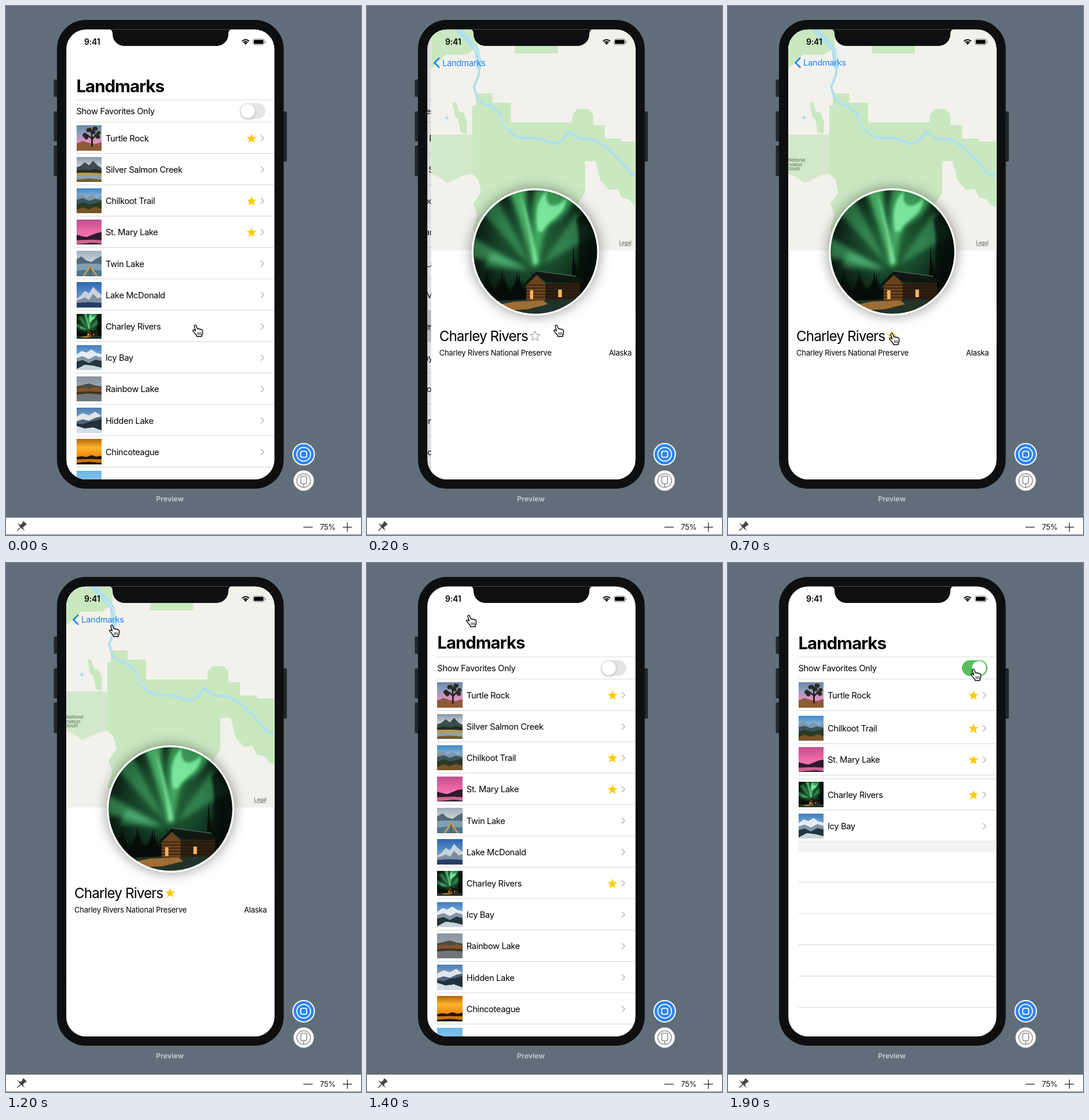
Write an HTML page with a canvas that moves like this. It is 613 px wide and 914 px high and loops after 2000 ms.

```html
<!DOCTYPE html>
<html lang="en">
<head>
<meta charset="utf-8">
<title>Landmarks preview</title>
<style>
html, body { margin: 0; width: 100%; height: 100%; overflow: hidden; background: #616e7a; }
canvas { display: block; }
</style>
</head>
<body>
<canvas id="stage" width="613" height="914"></canvas>
<script>
const ctx = document.getElementById('stage').getContext('2d');
const LOOP = 2000, STEP = 100, ROW = 54.2, WIDTH = 360;
const BLUE = '#1f86f4', YELLOW = '#fccb0a';
const TAP_ROW = 100, PUSH = 123, FAVORITE = 600, POP = 1284, FILTER = 1841;

const clamp = v => Math.max(0, Math.min(1, v));
const mix = (a, b, k) => a + (b - a) * k;
// Critically damped spring, 0 to 1
const spring = ms => {
  const x = Math.max(0, ms) * 0.077;
  return 1 - (1 + x) * Math.exp(-x);
};

// ---------- drawing helpers ----------
function text(str, x, y, size, color = '#000', weight = 400, spacing = -0.025, style = '') {
  ctx.font = `${style} ${weight} ${size}px Inter, "Liberation Sans", sans-serif`;
  ctx.letterSpacing = `${spacing * size}px`;
  ctx.fillStyle = color;
  ctx.fillText(str, x, y);
}
function box(x, y, w, h, color, radius = 0) {
  ctx.fillStyle = color;
  ctx.beginPath();
  ctx.roundRect(x, y, w, h, radius);
  ctx.fill();
}
function line(color, width, ...points) {
  ctx.strokeStyle = color;
  ctx.lineWidth = width;
  ctx.beginPath();
  for (let i = 0; i < points.length; i += 2) ctx.lineTo(points[i], points[i + 1]);
  ctx.stroke();
}
function disc(x, y, r, fill, stroke, width) {
  ctx.beginPath();
  ctx.arc(x, y, r, 0, 7);
  if (fill) { ctx.fillStyle = fill; ctx.fill(); }
  if (stroke) { ctx.strokeStyle = stroke; ctx.lineWidth = width; ctx.stroke(); }
}
function star(x, y, filled) {
  ctx.beginPath();
  for (let i = 0; i < 10; i++) {
    const a = i * Math.PI / 5 - Math.PI / 2, r = i % 2 ? 3.8 : 9;
    ctx.lineTo(x + r * Math.cos(a), y + r * Math.sin(a));
  }
  ctx.closePath();
  ctx.fillStyle = YELLOW;
  ctx.strokeStyle = '#8e8e93';
  ctx.lineWidth = 1;
  filled ? ctx.fill() : ctx.stroke();
}

// ---------- pictures, painted once in a 100 x 100 space ----------
function picture(size, paint) {
  const c = document.createElement('canvas');
  c.width = c.height = size;
  const g = c.getContext('2d');
  g.scale(size / 100, size / 100);
  paint(g, size);
  return c;
}
function fillWith(g, gradient, colors) {
  colors.forEach((c, i) => gradient.addColorStop(i / (colors.length - 1), c));
  g.fillStyle = gradient;
  g.fillRect(0, 0, 100, 100);
}
function ridge(g, color, ...heights) {
  g.fillStyle = color;
  g.beginPath();
  g.moveTo(0, 100);
  heights.forEach((y, i) => g.lineTo(100 * i / (heights.length - 1), y));
  g.lineTo(100, 100);
  g.fill();
}
function shape(g, path, color) {
  g.fillStyle = color;
  g.fill(new Path2D(path));
}
function stroke(g, path, width, color) {
  g.lineWidth = width;
  g.strokeStyle = color;
  g.stroke(new Path2D(path));
}
function firs(g, from, to, top, base) {
  g.fillStyle = '#060d08';
  for (let x = from, i = 0; x < to; x += 1.7, i++) {
    const y = top + (base - top) * 0.55 * Math.abs(Math.sin(i * 2.7));
    g.beginPath();
    g.moveTo(x, y); g.lineTo(x + 2.4, base); g.lineTo(x - 2.4, base);
    g.fill();
  }
}
function aurora(g, size) {
  fillWith(g, g.createRadialGradient(50, 42, 8, 50, 42, 62), ['#1f5c31', '#17472a', '#0c2315', '#07130c']);
  g.globalCompositeOperation = 'screen';
  g.filter = `blur(${size * 0.02}px)`;
  shape(g, 'M47 62L6 16L20 8Z', '#1c4f2b');
  shape(g, 'M45 64L0 38V54Z', '#245f36');
  shape(g, 'M44 64L10 62L16 50Z', '#1f5530');
  shape(g, 'M55 60L82 20L98 36Z', '#1b4c2a');
  shape(g, 'M48 62C44 42 36 18 28 0H43C42 20 47 42 52 60Z', '#36924a');
  shape(g, 'M49 60C49 40 46 20 50 0H84C79 14 74 22 64 27C57 31 55 40 53 60Z', '#2a7a3d');
  g.filter = `blur(${size * 0.01}px)`;
  shape(g, 'M49 60C46 40 42 22 38 4C45 22 49 40 52 58Z', '#3f9650');
  shape(g, 'M52 34C49 18 52 8 59 2C57 14 64 18 74 8C74 22 61 23 56 34Z', '#4fb866');
  g.globalCompositeOperation = 'source-over';
  shape(g, 'M80 90C82 66 87 46 82 24L90 18L101 12V90Z', 'rgba(5,12,8,.78)');
  g.filter = 'none';
  firs(g, 0, 48, 63, 88);
  firs(g, 80, 104, 44, 88);
  ridge(g, '#22332a', 89, 88, 87, 87, 88);
  shape(g, 'M18 92L34 89L56 88L60 91L44 95L24 96Z', '#a06d33');
  shape(g, 'M43 76L51 68L58 75V88H43Z', '#6b431d');
  shape(g, 'M58 75L85 74V87L58 88Z', '#2f2013');
  for (let y = 76; y < 88; y += 2.4) stroke(g, `M43 ${y}H85`, 0.5, '#1c130b');
  shape(g, 'M39 77L51 65L82 69L88 74L59 74L51 68L42 77Z', '#101712');
  stroke(g, 'M51 65L82 69', 0.7, '#46604e');
  g.fillStyle = '#ffb45a';
  g.fillRect(45.8, 80, 2.6, 7);
  g.fillRect(68, 79.5, 2.8, 6);
}
function joshuaTree(g) {
  stroke(g, 'M62 84V52L40 36M62 56L80 34M62 52L60 24', 6, '#2a2018');
  g.fillStyle = '#2c2a20';
  for (let i = 0; i < 12; i++) {
    g.beginPath();
    g.arc(60 + 28 * Math.cos(i * 2.4), 30 + 18 * Math.sin(i * 1.7), 8, 0, 7);
    g.fill();
  }
}
const scene = (sky, ridges, extra) => picture(88, g => {
  fillWith(g, g.createLinearGradient(0, 0, 0, 100), sky);
  ridges.forEach(r => ridge(g, ...r));
  if (extra) extra(g);
});
const nightCabin = picture(440, aurora);
const landmarks = [
  ['Turtle Rock', scene(['#6d86ab', '#8fa0bd', '#e58fc0', '#c9806f'],
    [['#8c5b44', 72, 62, 70, 74, 66], ['#8f5b31', 82, 78, 84, 80]], joshuaTree)],
  ['Silver Salmon Creek', scene(['#8797a6', '#dfe4e6', '#9ca8ae'],
    [['#3d4b4f', 42, 36, 22, 34, 16, 34, 44], ['#23301f', 56, 50, 54, 48, 55], ['#b89a4e', 64, 63, 65],
     ['#8fa3ad', 76, 74, 77], ['#6f5f31', 90, 86, 91]])],
  ['Chilkoot Trail', scene(['#3f86c4', '#a9c9de', '#d0dde4'],
    [['#8196a6', 34, 22, 38, 26, 40, 30], ['#3a5561', 46, 40, 50, 42, 48], ['#2c3a22', 66, 56, 64, 60, 52],
     ['#7a5428', 86, 76, 84, 74, 82]])],
  ['St. Mary Lake', scene(['#c0508f', '#f06aa8', '#e889b4'],
    [['#2c1a2c', 60, 66, 70, 62, 54, 50], ['#d0648f', 82, 81, 80, 82], ['#3a2034', 98, 95, 92, 96]])],
  ['Twin Lake', scene(['#9fb0bd', '#d3dadd', '#8fa9b8'],
    [['#53697a', 34, 22, 38, 44, 30, 20], ['#7fa0b4', 52, 50, 52], ['#4d7690', 78, 74, 78]],
    g => { stroke(g, 'M28 100L55 62L82 100', 7, '#c79a4b'); stroke(g, 'M55 66V100', 4, '#5f4a2c'); })],
  ['Lake McDonald', scene(['#2f66ad', '#5f92cc', '#88a9cc'],
    [['#c9d2dc', 66, 54, 34, 44, 18, 36, 50], ['#7d8da0', 72, 68, 60, 70, 46, 64, 60], ['#243f66', 82, 79, 82]])],
  ['Charley Rivers', nightCabin],
  ['Icy Bay', scene(['#3f7fc2', '#86b0d6', '#b9cddc'],
    [['#e6ecf1', 40, 24, 30, 18, 32, 36], ['#8296a6', 52, 44, 56, 42, 50], ['#26343c', 66, 60, 72, 58, 64],
     ['#c8d4dc', 96, 78, 82, 90]])],
  ['Rainbow Lake', scene(['#8593a3', '#a3a7a8', '#7d6a50'],
    [['#4d4b45', 40, 34, 28, 36, 40], ['#84532a', 50, 44, 49, 43, 50], ['#3f3322', 62, 60, 62],
     ['#6f767c', 72, 68, 72]])],
  ['Hidden Lake', scene(['#4a7db5', '#93b2cc', '#cfd9e0'],
    [['#dfe6eb', 36, 22, 30, 16, 34], ['#50657a', 54, 46, 52, 40, 34], ['#23303a', 62, 66, 56, 52, 44],
     ['#d6dee6', 72, 82, 78, 90]])],
  ['Chincoteague', scene(['#b8650c', '#ffb52e', '#f08a12', '#7a3c08'],
    [['#24150a', 72, 68, 71, 64, 70, 66], ['#c8760f', 80, 79, 80], ['#1c1209', 94, 90, 95]])],
  ['', scene(['#6cb8e8', '#a5d4f0'], [['#3f6a3c', 70, 62, 70]])],
  ['', scene(['#6cb8e8', '#a5d4f0'], [['#3f6a3c', 70, 62, 70]])]
];

// ---------- list page ----------
function toggle(on) {
  box(404, 168, 44, 27, on > 0.5 ? '#57bf60' : '#e4e4e5', 13.5);
  ctx.shadowColor = 'rgba(0,0,0,.25)';
  ctx.shadowBlur = 4;
  ctx.shadowOffsetY = 1.5;
  disc(mix(417.5, 434.5, on), 181.5, 12.3, '#fff');
  ctx.shadowColor = 'transparent';
}
function listPage(t, push) {
  const filtered = spring(t - FILTER);
  const favorites = t >= FAVORITE ? [0, 2, 3, 6] : [0, 2, 3];
  const separator = y => box(121.5, y - 0.6, 342, 1.2, '#dcdcde');
  ctx.save();
  ctx.translate(-0.3 * WIDTH * push, 0);
  separator(162);
  separator(200.5);
  text('Show Favorites Only', 121.5, 187.3, 14.7);
  toggle(filtered);
  let y = 200.5;
  landmarks.forEach(([name, image], i) => {
    const favorite = favorites.includes(i);
    const gone = favorite || i === 7 ? 0 : filtered;
    ctx.globalAlpha = clamp(1 - gone * 1.1);
    if (i === 6 && t >= TAP_ROW && t < POP) box(0, y, 600, ROW, '#d1d1d4');
    ctx.drawImage(image, 121.5, y + 5.8, 43.5, 43.5);
    text(name, 172, y + 33.2, 14.7);
    if (favorite) star(424, y + 28.5, true);
    line('#c3c3c7', 1.9, 440, y + 22.6, 445.2, y + 27.8, 440, y + 33);
    ctx.globalAlpha = 1;
    y += ROW * (1 - gone);
    if (!(gone && (i === 1 || i === 4))) separator(y);
  });
  while ((y += ROW) < 818) separator(y);
  ctx.restore();
  box(104, 41, WIDTH, 778, `rgba(0,8,0,${0.14 * push})`);
}

// ---------- detail page ----------
const PARKS = new Path2D(`M104 41H184V70L166 84H130L104 108Z M249 41H323V82H249Z
  M141 167L147 166L152 182L160 184L166 200L165 221L155 218L151 196L145 190Z
  M175 172H181V151H210V167H242V201H348V187L357 178H376L384 187V206H404V229H433V234H464V348L455 345
  L446 334L433 331L426 316L411 318L396 300L388 268H370V322L355 345L340 425H200L176 386L184 360
  L177 342L190 322L186 300L175 290Z`);
const RESERVE = new Path2D('M104 222H175V290L160 293L132 306L118 296L104 290Z');
const RIVER = new Path2D(`M148 41L165 56L182 74L189 95L186 120L178 140L184 160Q192 171 207 172L222 186
  L231 207L245 222Q258 230 285 228L317 238L331 232L342 217L360 229L385 231L405 243L425 262L440 278L450 291L464 294`);

function detailPage(t, offset) {
  ctx.save();
  ctx.translate(offset, 0);
  box(104, 41, WIDTH, 778, '#fff');
  ctx.save();
  ctx.beginPath();
  ctx.rect(104, 41, WIDTH, 381.5);
  ctx.clip();
  box(104, 41, WIDTH, 382, '#f3f1ec');
  ctx.fillStyle = '#d3e8cb';
  ctx.fill(RESERVE);
  ctx.fillStyle = '#c9e8c0';
  ctx.fill(PARKS);
  ctx.lineJoin = 'round';
  ctx.strokeStyle = '#aee0f1';
  ctx.lineWidth = 4;
  ctx.stroke(RIVER);
  line('#aee0f1', 8, 150, 41, 166, 57, 183, 76, 187, 108);
  line('#e4f1ea', 1.2, 176, 66, 185, 80, 188, 96);
  line('#e4f1ea', 1.2, 224, 192, 232, 208, 238, 212);
  disc(131, 193, 2.8, '#aee0f1');
  if (t >= 300) {
    ['National', 'rvation', 'South'].forEach((word, i) =>
      text(word, 104, 269 + i * 7.6, 7.4, '#4a6b4a', 400, 0, 'italic'));
  }
  text('Legal', 428.5, 412.3, 8.4, '#55564f', 400, 0);
  line('#55564f', 0.7, 428.5, 414, 449.5, 414);
  ctx.restore();

  ctx.shadowColor = 'rgba(0,0,0,.42)';
  ctx.shadowBlur = 22;
  disc(284, 425, 110, '#fff');
  ctx.shadowColor = 'transparent';
  ctx.save();
  ctx.beginPath();
  ctx.arc(284, 425, 106.8, 0, 7);
  ctx.clip();
  ctx.drawImage(nightCabin, 174, 315, 220, 220);
  ctx.restore();

  text('Charley Rivers', 118, 578.5, 24.2, '#000', 400, -0.036);
  star(283.5, 570.5, t >= FAVORITE);
  text('Charley Rivers National Preserve', 118, 603.8, 13, '#000', 400, -0.018);
  text('Alaska', 411, 603.8, 13, '#000', 400, -0.018);
  ctx.restore();
}

// Large title shrinks into the back button
function navTitle(push) {
  const k = push ** 0.75, tint = push * push;
  ctx.globalAlpha = 1 - 2.2 * push * (1 - push);
  text('Landmarks', mix(121.5, 130, k), mix(148.6, 103.3, k), mix(29.5, 14.7, k),
    `rgb(${31 * tint},${134 * tint},${244 * tint})`, push > 0.9 ? 400 : 700, mix(-0.036, -0.025, k));
  ctx.globalAlpha = clamp((push - 0.7) / 0.28);
  line(BLUE, 2.6, 125, 89.5, 116.5, 98, 125, 106.5);
  ctx.globalAlpha = 1;
}

// ---------- surroundings ----------
function statusBar() {
  ctx.fillStyle = '#0e0f10';
  ctx.fill(new Path2D('M178 40Q184 41 184 48C184 60 193 69 205 69H363C375 69 384 60 384 48Q384 41 390 40Z'));
  text('9:41', 135, 67.2, 14, '#000', 600, -0.015);
  [[2, 3], [5.3, 2], [8.7, 2]].forEach(([r, w]) => {
    ctx.beginPath();
    ctx.arc(413.7, 67, r, -Math.PI * 0.75, -Math.PI * 0.25);
    ctx.strokeStyle = '#000';
    ctx.lineWidth = w;
    ctx.stroke();
  });
  ctx.beginPath();
  ctx.roundRect(426.5, 57, 19.5, 10, 3);
  ctx.strokeStyle = '#8b8b8b';
  ctx.lineWidth = 1;
  ctx.stroke();
  box(428, 58.5, 16.5, 7, '#000', 1.5);
  box(447, 60.3, 1.5, 3.6, '#8b8b8b', 1);
}
function phoneBody() {
  box(0, 0, 613, 914, '#616e7a');
  [[82.5, 127, 30], [82.5, 182, 52], [82.5, 241, 53], [478, 182, 87]]
    .forEach(([x, y, h]) => box(x, y, 7, h, '#23282b', 2));
  box(88, 24, 391.5, 810, '#0e0f10', 50);
}
function canvasControls() {
  text('Preview', 259, 856, 12.4, '#c8cdd1', 600, 0);
  disc(514, 774.5, 19.5, '#fff');
  disc(514, 774.5, 17.5, '#2d85f6');
  disc(514, 774.5, 11.8, null, '#fff', 1.8);
  ctx.beginPath();
  ctx.roundRect(508.8, 769.3, 10.4, 10.4, 2.5);
  ctx.stroke();
  disc(514, 820, 17.5, '#fff');
  disc(514, 820, 11.8, null, '#8d8d8d', 1.5);
  box(508, 811.5, 12, 15, '#fff');
  ctx.beginPath();
  ctx.roundRect(509, 812.5, 10, 13, 2);
  ctx.stroke();
  line('#8d8d8d', 1.5, 514, 826, 514, 832);

  box(0, 884, 613, 30, '#fff');
  box(0, 912.5, 613, 1.5, '#a9adb0');
  line('#333', 1.4, 513.5, 900.5, 529.5, 900.5);
  line('#333', 1.4, 581.5, 900.5, 597.5, 900.5);
  line('#333', 1.4, 589.5, 892.5, 589.5, 908.5);
  text('75%', 542, 905, 13, '#111', 400, -0.02);
  ctx.save();
  ctx.translate(27, 899);
  ctx.rotate(Math.PI / 4);
  box(-4, -8.5, 8, 3, '#444', 1);
  box(-3, -6, 6, 7, '#444');
  box(-5.5, 0, 11, 2.4, '#444', 1);
  box(-0.7, 2, 1.4, 9, '#444');
  ctx.restore();
  line('#444', 1, 20, 893.5, 32, 906.5);
}

// ---------- pointer ----------
const HAND = new Path2D(`M-6-7.6C-6.4-9.8-3.6-10.6-2.7-8.6L-.4-3C.4-4 2.2-3.7 2.7-2.4C3.6-3.2 5.2-2.8 5.7-1.6
  C7-2 8.3-1.2 8.5 .4C9 3.6 8.4 5.8 7 8V10H-1.4V8.6C-3.4 6.4-5.2 3.6-7.4 1.6C-9.6-.4-7.6-2.4-5.6-1L-3.6 .4Z`);
const STOPS = [[0, 331, 561], [200, 331, 561], [600, 287, 575], [700, 287, 575], [1200, 187, 117],
  [1300, 176, 95], [1400, 180, 100], [1800, 428, 193], [2000, 428, 193]];
function pointer(t) {
  const i = STOPS.findIndex(s => s[0] > t);
  const [t0, x0, y0] = STOPS[i - 1], [t1, x1, y1] = STOPS[i];
  const u = (t - t0) / (t1 - t0), k = u * u * (3 - 2 * u);
  ctx.save();
  ctx.translate(mix(x0, x1, k), mix(y0, y1, k));
  ctx.fillStyle = '#fff';
  ctx.fill(HAND);
  ctx.strokeStyle = '#000';
  ctx.lineWidth = 1.4;
  ctx.lineJoin = 'round';
  ctx.stroke(HAND);
  for (const x of [0.2, 2.7, 5.2]) line('#000', 1, x, 2.6, x, 7.2);
  ctx.restore();
}

function draw() {
  const t = Math.floor(performance.now() % LOOP / STEP) * STEP;
  const push = t < POP ? spring(t - PUSH) : 1 - spring(t - POP);
  phoneBody();
  ctx.save();
  ctx.beginPath();
  ctx.roundRect(104.2, 40.5, 359.3, 777.5, 34);
  ctx.clip();
  box(104, 40, WIDTH, 779, '#fff');
  listPage(t, push);
  if (push > 0) detailPage(t, WIDTH * (1 - push));
  navTitle(push);
  statusBar();
  ctx.restore();
  canvasControls();
  pointer(t);
  requestAnimationFrame(draw);
}
draw();
</script>
</body>
</html>
```
